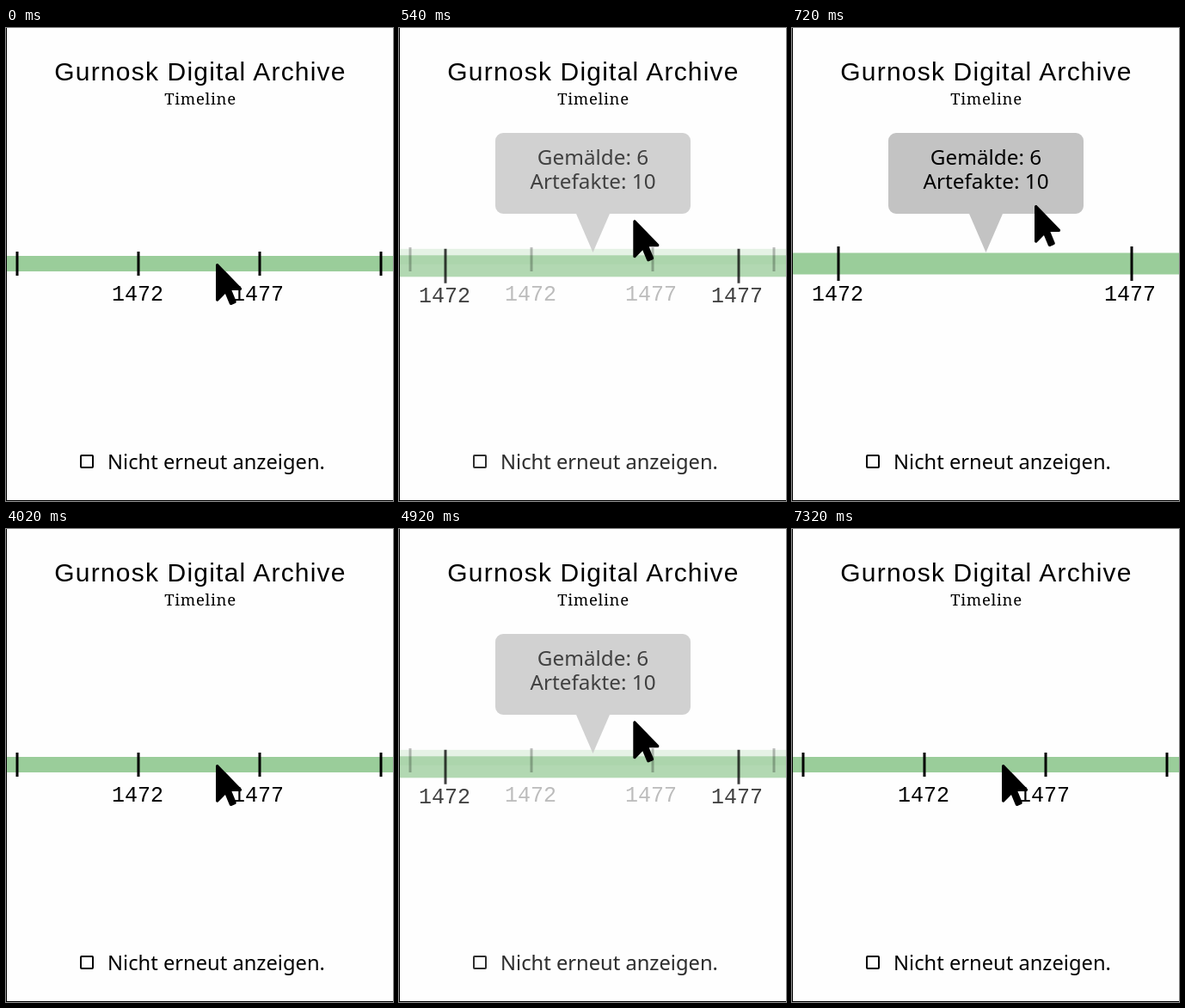
An HTML page that plays this animation: 450 px wide and 550 px high, repeating every 7800 ms.

```html
<!DOCTYPE html>
<html lang="de">
<head>
<meta charset="utf-8">
<title>Timeline</title>
<style>
  html, body { margin: 0; width: 100%; height: 100%; overflow: hidden; background: #fefefe; }
  svg { display: block; width: 450px; height: 550px; }
  text { text-anchor: middle; white-space: pre; }
  .title { font: 30px "Liberation Sans", Arial, sans-serif; letter-spacing: 1.2px; }
  .subtitle { font: 18.5px "Noto Serif", serif; letter-spacing: .7px; }
  .year { font: 25px "Liberation Mono", monospace; }
  .info { font: 24.3px "Noto Sans", sans-serif; }
  .option { font: 300 23.7px "Noto Sans", sans-serif; }
  .band { fill: #9acd9a; }
  .ticks { stroke: #000; stroke-width: 3; }
</style>
</head>
<body>
<svg viewBox="0 0 450 550">
  <defs>
    <g id="option">
      <rect x="87" y="497" width="14" height="14" rx="1" fill="none" stroke="#000" stroke-width="2"/>
      <text class="option" x="244.5" y="513">Nicht erneut anzeigen.</text>
    </g>
  </defs>

  <text class="title" x="226" y="61">Gurnosk Digital Archive</text>
  <text class="subtitle" x="226" y="89">Timeline</text>

  <rect class="band" data-state="far" data-shift="-11" y="265" width="450" height="18"/>
  <rect class="band" data-state="near" data-shift="11" y="261.5" width="450" height="25"/>

  <path class="ticks" data-state="far" data-shift="-6.8" d="M13 260v28M154 260v28M295 260v28M436 260v28"/>
  <path class="ticks" data-state="near" data-shift="11" d="M54 254v40M395 254v40"/>

  <g class="year" data-state="far" data-shift="0">
    <text x="153" y="317">1472</text>
    <text x="293" y="317">1477</text>
  </g>
  <g class="year" data-state="near" data-shift="6">
    <text x="53" y="317">1472</text>
    <text x="393" y="317">1477</text>
  </g>

  <g data-state="near" data-shift="0">
    <path fill="#c3c3c3" d="M121 122h209a9 9 0 0 1 9 9v76a9 9 0 0 1-9 9h-85l-19.5 45-19.5-45h-85a9 9 0 0 1-9-9v-76a9 9 0 0 1 9-9z"/>
    <text class="info" x="225.5" y="159">Gemälde: 6</text>
    <text class="info" x="225.5" y="187">Artefakte: 10</text>
  </g>

  <use href="#option" data-state="far" data-shift="0"/>
  <use href="#option" data-state="near" data-shift="0"/>

  <path id="cursor" d="M302 329H196l55.8 135.3c3.9 9.4-.6 20-9.8 24l-49.2 21.4c-9.2 4-19.4-.6-23.3-9.7L116.5 372l-86.6 88.9C18.3 472.7 0 463.5 0 448V18.3C0 1.9 19.9-6 30.3 5.1l284.4 292c11.5 11.8 3 32.6-12.7 32.1z"/>
  <path d="M0 0h1v549h449v1H0z"/>
</svg>
<script>
  const LOOP = 7800;
  const STEP = 60;
  const EASE = [.183, .5, .745, .88, .96, 1];
  const ZOOMS = [{ start: 420, end: 4020 }, { start: 4800, end: 7320 }];

  const parts = [...document.querySelectorAll("[data-state]")];
  const cursor = document.getElementById("cursor");

  function progress(time) {
    const zoom = ZOOMS.find(z => time >= z.start && time < z.end);
    if (!zoom) return 0;
    const step = Math.floor((time - zoom.start) / STEP);
    return EASE[Math.min(step, EASE.length - 1)];
  }

  function draw(p) {
    for (const part of parts) {
      const far = part.dataset.state === "far";
      const shift = part.dataset.shift * (far ? p : 1 - p);
      part.setAttribute("opacity", far ? 1 - p : p);
      part.setAttribute("transform", `translate(0 ${shift})`);
    }
    cursor.setAttribute("transform", `translate(${244 + 38 * p} ${274 - 68 * p}) scale(.094)`);
  }

  const origin = performance.now();
  function frame() {
    draw(progress((performance.now() - origin) % LOOP));
    requestAnimationFrame(frame);
  }
  frame();
</script>
</body>
</html>
```
